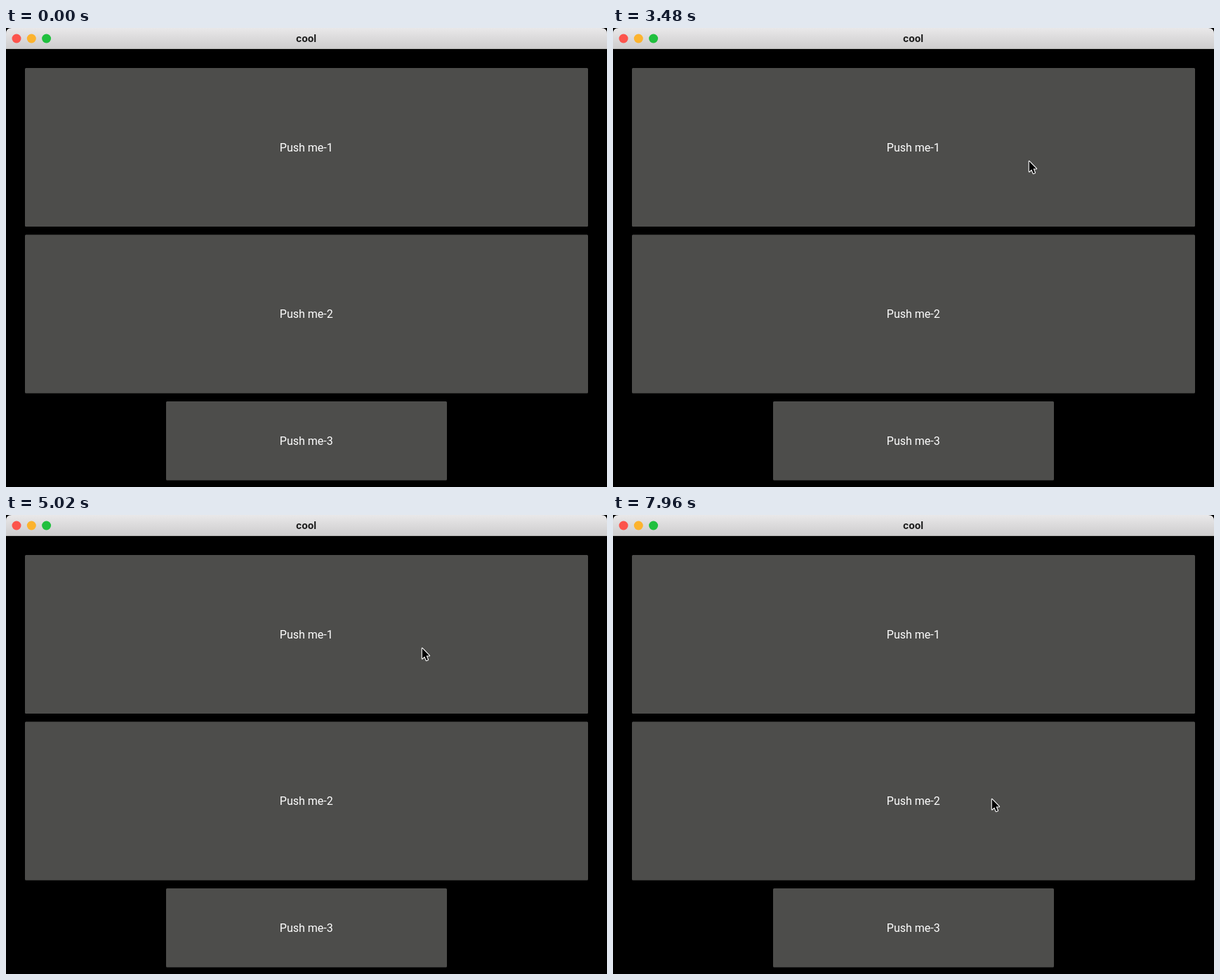
An HTML page that plays this animation: 856 by 654 pixels, repeating every 8 s.

```html
<!DOCTYPE html>
<html lang="en">
<head>
<meta charset="utf-8">
<title>cool</title>
<style>
  html, body { margin: 0; width: 100%; height: 100%; overflow: hidden; background: #000; }
  svg { display: block; width: 856px; height: 654px; }
  text { text-anchor: middle; }
  .title { font: 700 14px Inter, sans-serif; fill: #1c1c1c; }
  .label { font: 16px Roboto, sans-serif; fill: #fff; }
  .button { fill: #4d4d4b; }
  .cursor { fill: #000; stroke: #fff; stroke-width: 2.2; stroke-linejoin: round; paint-order: stroke; }
</style>
</head>
<body>
<svg viewBox="0 0 856 654">
  <defs>
    <linearGradient id="bar" x2="0" y2="1">
      <stop offset="0" stop-color="#e9e8e9"/>
      <stop offset="1" stop-color="#cdcccd"/>
    </linearGradient>
  </defs>
  <rect width="856" height="654"/>
  <path d="M0 30V8Q0 0 8 0H848Q856 0 856 8V30Z" fill="url(#bar)"/>
  <rect y="29" width="856" height="1" fill="#b9b9b7"/>
  <circle cx="15" cy="15" r="6.5" fill="#fc544c"/>
  <circle cx="36.3" cy="15" r="6.5" fill="#fcb32e"/>
  <circle cx="57.6" cy="15" r="6.5" fill="#20c03e"/>
  <text class="title" x="427.5" y="19.5">cool</text>
  <g id="buttons"></g>
  <path id="cursor" class="cursor" d="M.8 2V16.6L4.2 13.4L6.7 19.2L9 18.2L6.6 12.5H11Z"/>
</svg>
<script>
const LOOP = 8000;
const OFF_STAGE = 870;

// x, y, width, height
const boxes = [
  [27, 57, 802, 226],
  [27, 294.5, 802, 226],
  [228, 532, 400, 112.5],
];

function add(tag, parent, attrs, text = '') {
  const node = document.createElementNS('http://www.w3.org/2000/svg', tag);
  for (const [name, value] of Object.entries(attrs)) node.setAttribute(name, value);
  node.textContent = text;
  return parent.appendChild(node);
}

function play(node, steps) {
  const frames = steps.map(([time, style, easing = 'linear']) => ({ offset: time / LOOP, easing, ...style }));
  node.animate(frames, { duration: LOOP, iterations: Infinity });
}

const group = document.getElementById('buttons');
const buttons = boxes.map(([x, y, width, height], i) => {
  const rect = add('rect', group, { class: 'button', x, y, width, height, rx: 1.5 });
  add('text', group, { class: 'label', x: x + width / 2 - 0.2, y: y + height / 2 + 5.7 }, `Push me-${i + 1}`);
  return rect;
});

// time, x, y, easing to the next point
const path = [
  [0, OFF_STAGE, 216],
  [1560, OFF_STAGE, 216],
  [1700, 821, 210, 'ease-out'],
  [2340, 668, 191],
  [2600, 668, 191, 'ease-in-out'],
  [3400, 592, 188],
  [6300, 592, 188, 'ease-in'],
  [6740, 561, 283],
  [6800, 554, 305, 'ease-out'],
  [7320, 539, 403],
  [LOOP, 539, 403],
];
play(document.getElementById('cursor'),
  path.map(([time, x, y, easing]) => [time, { transform: `translate(${x}px, ${y}px)` }, easing]));

const idle = { fill: '#4d4d4b' };
const pressed = { fill: '#2298d0' };
play(buttons[0], [
  [0, idle], [4900, idle],
  [4900, pressed], [5020, pressed],
  [5020, idle], [LOOP, idle],
]);
</script>
</body>
</html>
```
